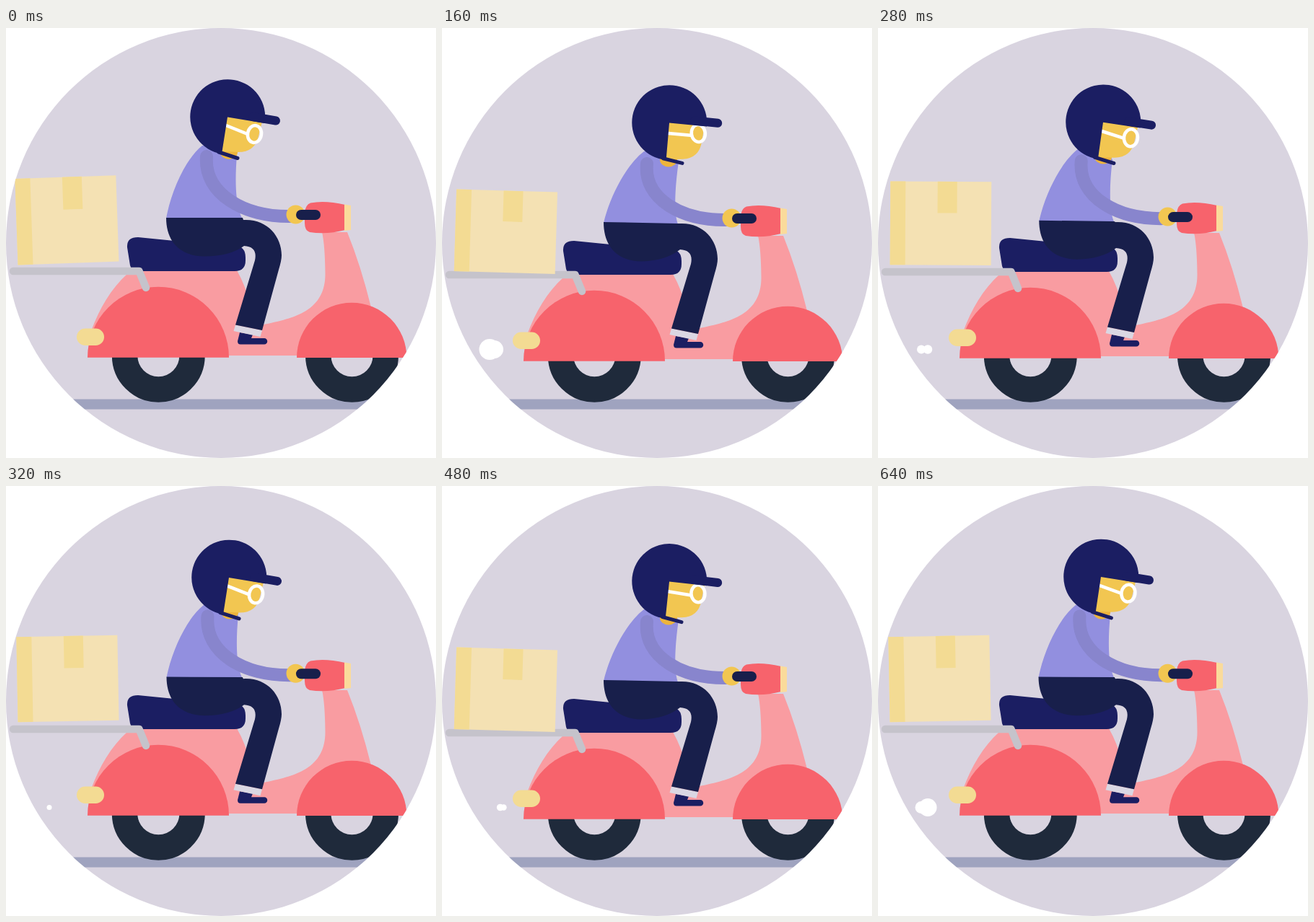
Recreate the animation shown at these times as an HTML page. Size 596 px wide and 596 px high, loop 0.68 s.

```html
<!DOCTYPE html>
<html lang="en">
<head>
<meta charset="utf-8">
<title>Scooter delivery</title>
<style>
html, body { margin: 0; width: 100%; height: 100%; overflow: hidden; background: #fff; }
svg { display: block; width: 100vw; height: 100vh; }
.navy { fill: #1b1e62; }
.dark { fill: #181f4b; }
.red { fill: #f7636c; }
.skin { fill: #f2c651; }
.tape { fill: #f3db93; }
.line { fill: none; stroke-linecap: round; stroke-linejoin: round; }
</style>
</head>
<body>
<svg viewBox="0 0 596 596">
  <clipPath id="disc"><circle cx="298" cy="298" r="298"/></clipPath>
  <g clip-path="url(#disc)">
    <rect width="596" height="596" fill="#d9d4e0"/>
    <rect y="514.5" width="596" height="14" fill="#9fa3bf"/>
    <g class="line" stroke="#1f2a3b" stroke-width="35.5">
      <circle cx="211.3" cy="454.3" r="46.7"/>
      <circle cx="479.5" cy="454.3" r="46.7"/>
    </g>
    <g fill="#fff">
      <circle id="puffA"/>
      <circle id="puffB"/>
    </g>

    <g id="scooter">
      <path fill="#f99ca1" d="M118 420C130 388 145 362 168 341L185 336H320C328 350 334 366 338 380L345 413L357 411C400 402 443 392 442.500 340Q442 300 438 283H473Q492 330 506 387L480 454H290L118 454Z"/>
      <path class="navy" d="M183 290L300 301.500H318Q332 303 332 318V322Q332 337 317 337H182Q174 337 172 329L168 304Q167 290 183 290Z"/>
      <path class="red" d="M113 456.700A98 98 0 0 1 309 456.700Z"/>
      <path class="red" d="M403 457A76.200 76.200 0 0 1 555.400 457Z"/>
      <rect class="tape" x="98" y="416.500" width="38" height="23.500" rx="11.700"/>
      <path class="line" stroke="#c5c3cb" stroke-width="10.500" d="M10 337H184.500L194 360"/>
      <path class="red" d="M422 242.500Q442 238.500 470 245V280Q445 286.500 421 283Q414 281 414 270V256Q415 245 422 242.500Z"/>
      <path fill="#fadb9b" d="M469 244.500L478 246V280L469 281Z"/>
    </g>

    <g id="box">
      <rect x="-70" y="-119.500" width="140" height="119.500" fill="#f4e1b3"/>
      <rect class="tape" x="-70" y="-119.500" width="21" height="119.500"/>
      <rect class="tape" x="-4.500" y="-119.500" width="27" height="45"/>
    </g>

    <path id="torso" fill="#928fdf"/>
    <path id="shoe" class="navy" d="M324 422L342 425L340 430H358A4.250 4.250 0 0 1 358 438.500H325Q321 438.500 321 434Z"/>
    <path id="cuff" fill="#dad7e3" d="M318 411.500L355 419L352.500 428L315.500 420Z"/>
    <path id="trousers" class="dark"/>
    <path id="arm" class="line" stroke="#8885cd" stroke-width="18"/>
    <g id="hand">
      <circle class="skin" cx="401.500" cy="258.500" r="13"/>
      <rect class="dark" x="402" y="252" width="34" height="14" rx="7"/>
    </g>

    <ellipse id="neck" fill="#edb43c" rx="12" ry="10"/>
    <g id="head">
      <g id="face">
        <path class="skin" d="M307 118L356 126L350 150Q345 172 322 172L298 171Z"/>
        <g id="glasses" class="line" stroke="#fff" stroke-width="4.500">
          <path d="M305 135L333.500 146.500"/>
          <ellipse cx="344.500" cy="147" rx="9.500" ry="12" transform="rotate(10 344.500 147)"/>
        </g>
      </g>
      <path class="navy" d="M307 123.500L358.500 132A52 52 0 1 0 299 174.500Z"/>
      <path class="line" stroke="#1b1e62" stroke-width="12" d="M342 123L374 128.500"/>
      <path class="line" stroke="#1b1e62" stroke-width="5" d="M295 172L321 180.500"/>
    </g>
  </g>
</svg>
<script>
const LOOP = 680, STEP = 40, BOUNCE = 320;
const el = id => document.getElementById(id);
const move = (id, value) => el(id).setAttribute('transform', value);
const draw = (id, d) => el(id).setAttribute('d', d);

// softened triangle wave, 0 -> 1 -> 0
function bounce(t) {
  if (t < 0) return 0;
  const u = 1 - Math.abs(1 - (t % BOUNCE) / (BOUNCE / 2));
  return u / 2 + (1 - Math.cos(Math.PI * u)) / 4;
}

// linear interpolation over [time, value] pairs
function track(keys, t) {
  const i = keys.findIndex(k => k[0] > t);
  if (i < 0) return keys[keys.length - 1][1];
  if (i === 0) return keys[0][1];
  const [t0, a] = keys[i - 1], [t1, b] = keys[i];
  return a + (b - a) * (t - t0) / (t1 - t0);
}

const NOD = [[0, 0], [40, .08], [80, .4], [160, 1], [240, .45], [320, .02], [400, .1],
  [480, .75], [520, 1], [560, .82], [640, .1]];
const HEAD_LAG = [[0, 0], [160, -.5], [240, 2.5], [320, 1.4], [400, .4], [560, .5], [640, .4]];
const PUFF_CYCLE = 400;
const PUFF_A = { x: [[40, 88], [160, 66], [240, 60]], r: [[40, 0], [160, 14.5], [240, 8.5], [320, 3.5], [360, 0]] };
const PUFF_B = { x: [[40, 92], [160, 72.5], [240, 69]], r: [[40, 0], [160, 12.5], [240, 12.5], [320, 0]] };

function puff(id, { x, r }, t) {
  const c = el(id);
  c.setAttribute('cx', track(x, t));
  c.setAttribute('cy', 445.5);
  c.setAttribute('r', track(r, t));
}

function render(t) {
  const ride = bounce(t);
  const q = bounce(t - 40) / bounce(120); // rider follows slightly late
  const nod = track(NOD, t);
  const p = (x, y, dx, dy) => `${x + dx * q} ${y + dy * q} `;

  move('scooter', `translate(0 ${5 * ride})`);
  move('box', `translate(${86.5 + .2 * q} ${326 + 13 * ride}) rotate(${-2 + 3.7 * q}) scale(1 ${1 - .05 * q})`);

  draw('torso', `M${p(222, 264, 2, 6)}C${p(229, 225, 4, 7)}${p(250, 180, 7, 8)}${p(272, 163, 8, 8)}` +
    `Q${p(296, 160, 8, 8)}${p(320, 177, 8, 8)}C${p(317, 212, 6, 8)}${p(318, 248, 3, 8)}${p(328, 265, -1, 7)}Z`);
  draw('trousers', `M${p(222, 263, 2, 6)}L${p(328, 263, -1, 8)}L${p(329, 266, 0, 5)}` +
    `C${p(361, 264, 0, 5)}${p(382, 288, 0, 5)}${p(382, 315, 0, 5)}` +
    `Q${p(382, 322, 0, 5)}${p(378, 335, 0, 5)}L${p(355, 419, 0, 5)}L${p(318, 411.5, 0, 5)}` +
    `L${p(345, 322, 0, 5)}Q${p(349, 303, 0, 5)}${p(330, 302, 0, 5)}` +
    `Q${p(310, 316.5, 0, 6)}${p(275, 316.5, 2, 7)}C${p(240, 316, 2, 7)}${p(222, 295, 2, 7)}${p(222, 263, 2, 6)}Z`);
  draw('arm', `M${p(278, 178, 6, 10)}C${p(274, 230, 5, 7)}${p(330, 262, 2, 5)}${p(395, 261, 0, 5)}`);
  for (const id of ['shoe', 'cuff', 'hand']) move(id, `translate(0 ${5 * q})`);

  move('neck', `translate(${p(309, 172, 5, 10.5)})`);
  move('head', `translate(${8 * q} ${8.5 * q + track(HEAD_LAG, t)}) rotate(${-4 * nod} 307 123)`);
  move('face', `translate(0 ${3 * nod})`);
  move('glasses', `rotate(${-13 * nod} 305 135)`);

  puff('puffA', PUFF_A, t % PUFF_CYCLE);
  puff('puffB', PUFF_B, t % PUFF_CYCLE);
}

const start = performance.now();
function tick() {
  const t = (performance.now() - start) % LOOP;
  render(Math.floor(t / STEP) * STEP);
  requestAnimationFrame(tick);
}
tick();
</script>
</body>
</html>
```
